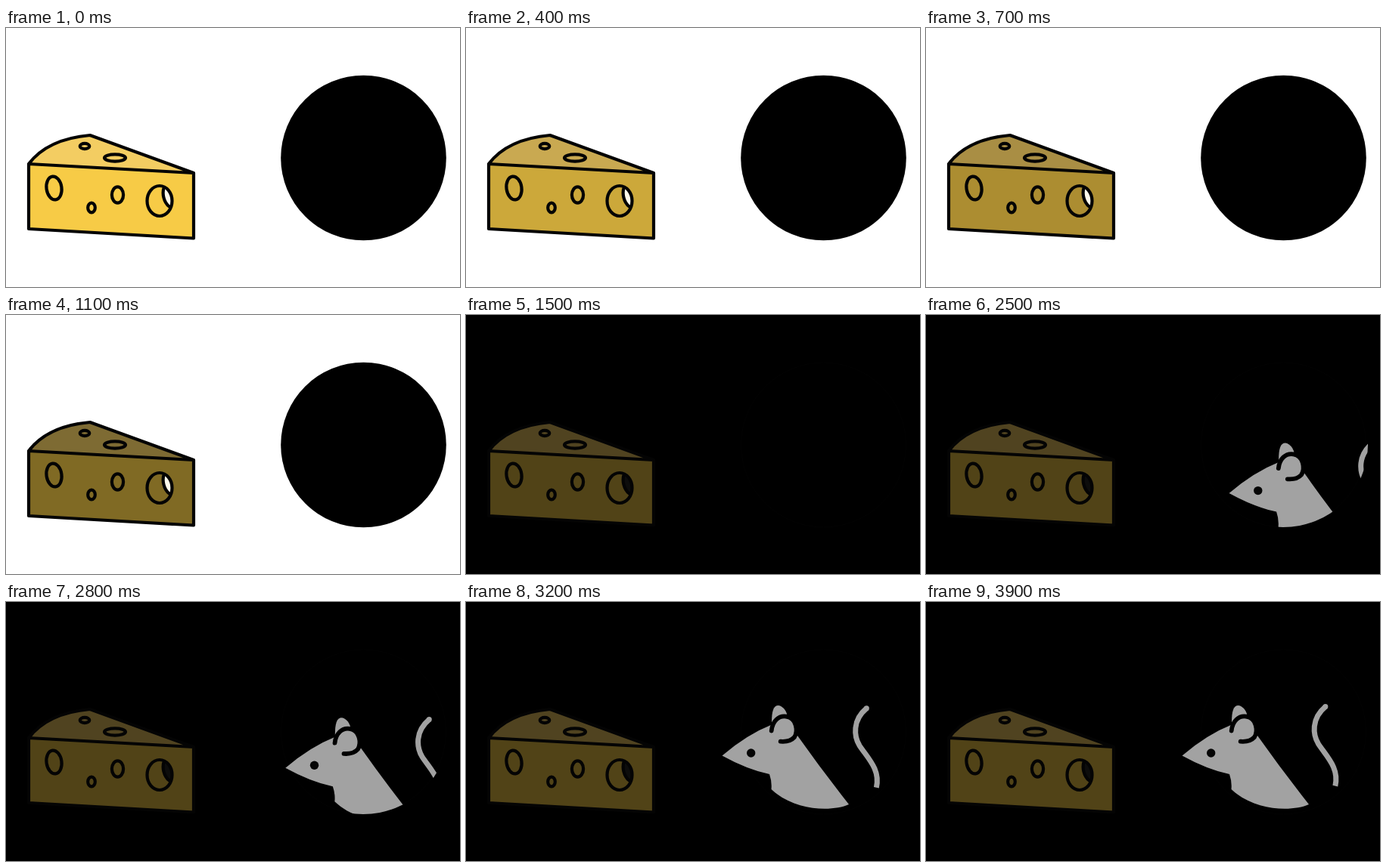
Recreate the animation shown at these times as an HTML page. Size 600 px wide and 343 px high, loop 4 s.

```html
<!DOCTYPE html>
<html lang="en">
<head>
<meta charset="utf-8">
<title>Cheese and mouse</title>
<style>
html, body { margin: 0; width: 100%; height: 100%; overflow: hidden; background: #fff; }
svg { display: block; width: 100vw; height: 100vh; }
.ink { fill: none; stroke: #040404; stroke-width: 4.2; stroke-linejoin: round; stroke-linecap: round; }
</style>
</head>
<body>
<svg viewBox="0 0 600 343" preserveAspectRatio="none">
  <defs>
    <clipPath id="burrow">
      <ellipse cx="472" cy="172" rx="112" ry="109"/>
      <rect width="400" height="343"/>
    </clipPath>
    <clipPath id="hole"><ellipse cx="203" cy="229" rx="16" ry="20"/></clipPath>
  </defs>

  <rect id="room" width="600" height="343"/>
  <circle cx="472.5" cy="172" r="109.3"/>
  <circle id="rim" cx="472.5" cy="172" r="109" fill="none" stroke="#030303"/>

  <g id="cheese">
    <path id="top" d="M30 180Q55 147 111 142L248 192Z"/>
    <path id="front" d="M30 180L248 192V278.5L30 266Z"/>
    <g clip-path="url(#hole)">
      <ellipse id="gap" class="ink" cx="222" cy="221" rx="14" ry="19" transform="rotate(-14 222 221)"/>
    </g>
    <g class="ink">
      <path d="M30 180Q55 147 111 142L248 192V278.5L30 266ZL248 192"/>
      <ellipse cx="104" cy="156.5" rx="6.3" ry="3.6"/>
      <ellipse cx="144" cy="172" rx="14" ry="4.6"/>
      <ellipse cx="63.5" cy="212" rx="10" ry="15.5" transform="rotate(-8 63.5 212)"/>
      <ellipse cx="147.5" cy="221" rx="7.6" ry="10.6"/>
      <ellipse cx="113" cy="238" rx="4.8" ry="6.4"/>
      <ellipse cx="203" cy="229" rx="16.5" ry="20"/>
    </g>
  </g>

  <g clip-path="url(#burrow)">
    <g id="mouse" fill="#a2a2a2">
      <g id="tail">
        <path d="M529.5 141C510.5 157 513 178 520 190C531 207 548 222 542.5 246" fill="none" stroke="#a2a2a2" stroke-width="7"/>
        <circle cx="529.5" cy="141" r="3.5"/>
      </g>
      <path d="M338.5 203.5Q371 175.5 405 162L437 175.5Q470.5 223 506 268C484 278 434 277 403.5 248Q404.5 238 401 228Q372 222 338.5 203.5Z"/>
      <path d="M404 160C404 145 406 137 413 137C419 138 424 144 425 153L415 158Z"/>
      <circle cx="421" cy="168" r="14"/>
      <path d="M403.7 170.5C405 158 413 150 423.5 151.7C437 153.7 439 171 434 179Q428 185.7 415.7 184.7" fill="none" stroke="#000" stroke-width="5.8" stroke-linecap="round"/>
      <circle cx="376.7" cy="200" r="5.7" fill="#050505"/>
    </g>
  </g>
</svg>
<script>
const LOOP = 4000, STEP = 100;
const $ = id => document.getElementById(id);
const shade = (rgb, k) => `rgb(${rgb.map(v => Math.round(v * k))})`;
const move = (id, x, y) => $(id).setAttribute('transform', `translate(${x.toFixed(2)} ${y.toFixed(2)})`);
const show = (id, on) => $(id).setAttribute('visibility', on ? 'visible' : 'hidden');

function draw(time) {
  const t = Math.floor(time % LOOP / STEP) * STEP;

  // The cheese dims first, then the room goes dark in two steps.
  const dark = t < 1400 ? 0 : t < 1500 ? 0.5 : 1;
  const light = (1 - 0.48 * Math.min(t / 1100, 1)) * (1 - 0.37 * dark);
  $('front').setAttribute('fill', shade([247, 203, 70], light));
  $('top').setAttribute('fill', shade([243, 205, 98], light));
  $('room').setAttribute('fill', shade([255, 255, 255], 1 - dark));
  $('gap').style.fill = shade([255, 250, 235], 1 - 0.95 * dark);
  show('rim', dark === 1);

  // The mouse slides out, slowing down, while its tail sways.
  show('mouse', t >= 1800);
  const away = 85 * Math.pow(Math.max(3200 - t, 0) / 900, 1.25);
  move('mouse', away, away * 0.525);
  const sway = (1 + Math.cos((t - 3700) / 1200 * 2 * Math.PI)) / 2;
  move('tail', -2.2 * sway, -3.2 * sway);
}

let start;
function tick(now) {
  start ??= now;
  draw(Math.max(now - start, 0));
  requestAnimationFrame(tick);
}
draw(0);
requestAnimationFrame(tick);
</script>
</body>
</html>
```
